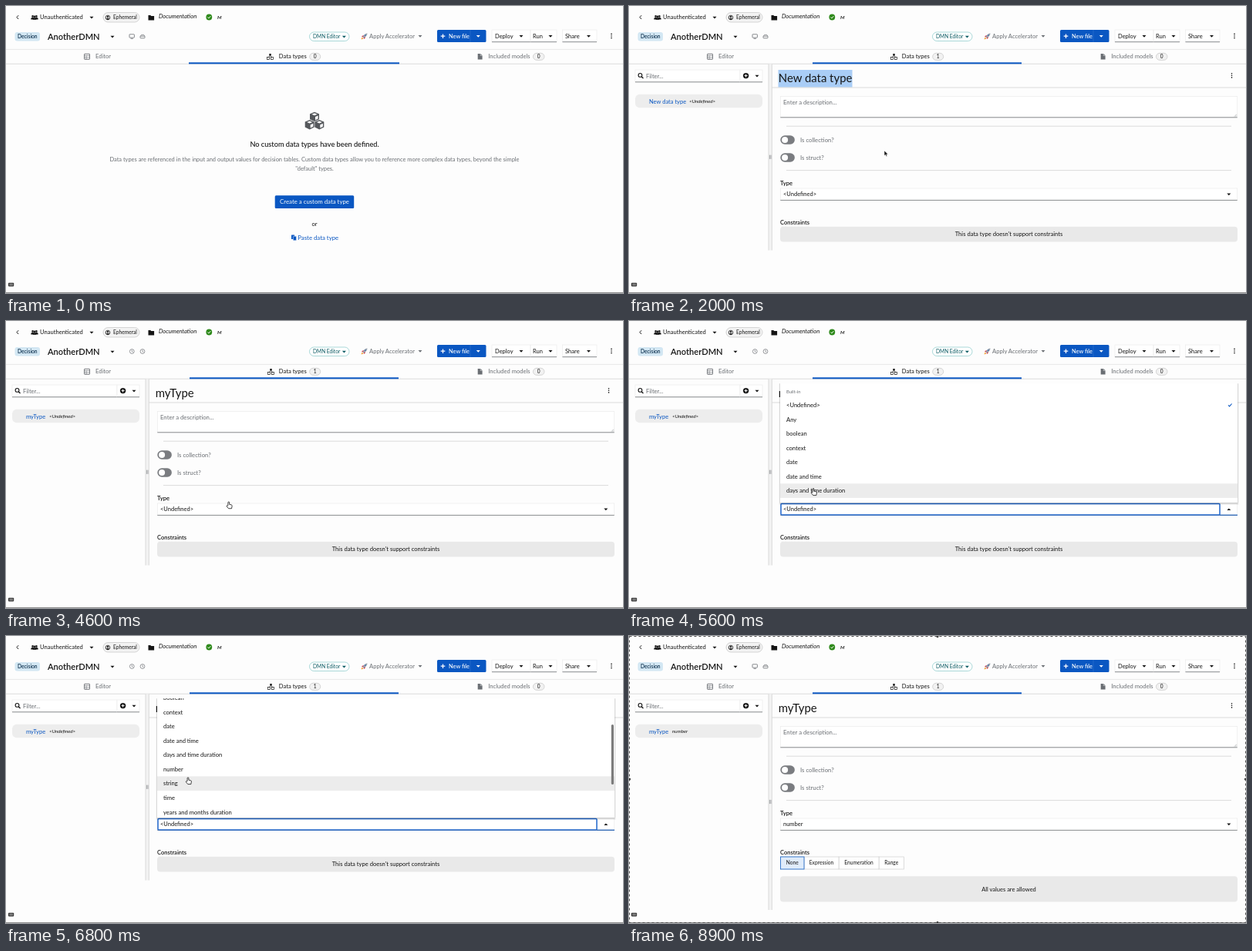
Write an HTML page that moves like this. It is 800 by 373 pixels and loops after 9 s.

```html
<!DOCTYPE html>
<html lang="en">
<head>
<meta charset="utf-8">
<title>Custom data type</title>
<style>
html, body { margin: 0; width: 100%; height: 100%; overflow: hidden; background: #fdfdfd; }
#stage { display: block; width: 100vw; height: 100vh; }
text { font: 7.6px Lato, "Open Sans", sans-serif; fill: #151515; white-space: pre; }
</style>
</head>
<body>
<svg id="stage" viewBox="0 0 800 373"></svg>
<script>
const BLUE = '#0a57c2', INK = '#151515', GRAY = '#6a6e73', RULE = '#d2d2d2', EDGE = '#8a8d90';
const LOOP = 9000, STEP = 100;

// Moments at which the interface changes
const CREATED = 1100, OPENED = 5000, RENAMED = 3800, CHOSEN = 7300;
const TYPING = [[2500, 'm'], [2600, 'my'], [3000, 'myT'], [3200, 'myTy'], [3500, 'myTyp'], [3600, 'myType']];
const TYPES = ['<Undefined>', 'Any', 'boolean', 'context', 'date', 'date and time', 'days and time duration',
  'number', 'string', 'time', 'years and months duration'];
const ROW = 18.55;

// Pointer stops: time, x, y
const POINTER = [[200, 511, 361], [300, 464, 271], [400, 464, 271], [900, 412, 254], [1100, 408, 252], [1400, 400, 246],
  [2000, 331, 188], [2200, 322, 180], [3900, 322, 180], [4700, 284, 243], [5300, 262, 243], [5400, 258, 240],
  [5600, 239, 218], [6400, 236, 195], [6800, 236, 184], [7200, 235, 174], [7700, 235, 173],
  [8200, 243, 295], [8300, 243, 295], [8800, 330, 385]];
const SCROLL = [[6400, 0], [6800, 66]];

const el = (name, attrs, body = '') =>
  `<${name} ${Object.entries(attrs).map(([k, v]) => `${k}="${v}"`).join(' ')}>${body}</${name}>`;
const text = (x, y, s, { size, weight, italic, fill, mid } = {}) => el('text', { x, y,
  'text-anchor': mid ? 'middle' : 'start',
  style: (size ? `font-size:${size}px;` : '') + (weight ? `font-weight:${weight};` : '') +
    (italic ? 'font-style:italic;' : '') + (fill ? `fill:${fill}` : '') }, s.replace(/</g, '&lt;'));
const rect = (x, y, width, height, fill, rx = 0, stroke = 'none', sw = .7) =>
  el('rect', { x, y, width, height, fill, rx, stroke, 'stroke-width': sw });
const fillPath = (d, fill = INK) => el('path', { d, fill });
const line = (d, stroke = INK, width = 1) => el('path', { d, fill: 'none', stroke, 'stroke-width': width });
const dot = (cx, cy, r, fill = INK) => el('circle', { cx, cy, r, fill });
const ring = (cx, cy, r, stroke, width = .7) => el('circle', { cx, cy, r, fill: 'none', stroke, 'stroke-width': width });
const at = (x, y, body) => el('g', { transform: `translate(${x} ${y})` }, body);
const caret = (x, y, fill = INK, up = false) => fillPath(`M${x - 2.5} ${y + (up ? 1.3 : -1.3)}h5l-2.5 ${up ? -2.7 : 2.7}z`, fill);
const kebab = (x, y) => [-2.6, 0, 2.6].map(d => dot(x, y + d, .8)).join('');
const field = (x, y, w, h) => rect(x, y, w, h, '#fff', 0, '#ececec') + line(`M${x} ${y + h}h${w}`, EDGE);
const pill = (x, y, w, h, fill, stroke) => rect(x, y, w, h, fill, h / 2, stroke);

function along(stops, t) {
  if (t <= stops[0][0]) return stops[0].slice(1);
  const i = stops.findIndex(s => s[0] >= t);
  if (i < 0) return stops.at(-1).slice(1);
  const [a, b] = [stops[i - 1], stops[i]], k = (t - a[0]) / (b[0] - a[0]);
  return a.slice(1).map((v, j) => v + (b[j + 1] - v) * k);
}

const person = (x, y, fill) => dot(x, y - 1.6, 1.3, fill) + fillPath(`M${x - 2.2} ${y + 2.4}v-1q0-1.5 1.5-1.5h1.4q1.5 0 1.5 1.5v1z`, fill);

const rocket = at(464.5, 39.5,
  fillPath('M-4 4l1-3 2 2z', '#f2a13a') +
  fillPath('M-3.6.2l2.4-1.8 2.8 2.8-1.6 2.4-1-2-1.3-1.2z', '#c8374a') +
  fillPath('M4-4Q.5-4-2 .8L-.8 2Q4-.5 4-4z', '#9aa4b0') + dot(1.3, -1.4, .9, '#3d6fa8'));

const header = [
  line('M16.2 12.2l-2.3 2.4 2.3 2.4', INK, 1),
  person(34.6, 15, INK), person(39.4, 15, INK), person(37, 15.4, INK),
  text(44, 17.4, 'Unauthenticated'), caret(111, 15),
  pill(126, 8.5, 47, 12.5, '#f3f3f3', '#c4c4c4'), ring(132, 15, 2.8, INK, .8), dot(132, 14.2, 1.1), fillPath('M130.2 16.8q1.8-1.9 3.6 0l-1.8 1z'),
  text(139, 17.4, 'Ephemeral', { size: 6.65 }),
  fillPath('M184.5 12h2.8l1 1.1h3.8v5.4h-7.6z'),
  text(198, 16.2, 'Documentation', { italic: true }),
  dot(263.3, 14.5, 3.9, '#2f8a1c'), line('M261.4 14.6l1.4 1.4 2.5-2.8', '#fff', 1),
  text(274, 17.2, 'M', { size: 6.4, italic: true, weight: 600 }),
  rect(11.5, 34, 32.5, 11.5, '#d3e7f3', 3), text(15, 42.2, 'Decision', { size: 6.7, weight: 600, fill: '#0c2f4d' }),
  text(54, 43.8, 'AnotherDMN', { size: 11.1, weight: 600 }), caret(138, 40),
  pill(393.5, 34, 51.5, 11.5, '#fff', '#86c9c9'), text(398, 42, 'DMN Editor', { size: 6.6, fill: '#0b5b63' }), caret(438.4, 40, '#0b5b63'),
  rocket, text(471, 42, 'Apply Accelerator', { fill: GRAY }), caret(537, 39.3, GRAY),
  rect(559, 31, 63.5, 16, BLUE, 1.5), line('M602 31v16', '#2f74d0', .6), line('M563.7 39.2h5.6M566.5 36.4v5.6', '#fff', 1.2),
  text(574, 41.8, 'New file', { size: 7.4, weight: 500, fill: '#fff' }), caret(612.3, 39.3, '#fff'),
  field(630, 31, 84, 15.7), line('M680 31v15.7', '#e2e2e2', .7),
  text(634, 41.8, 'Deploy', { size: 7.5 }), caret(668, 39.3), text(683, 41.8, 'Run', { size: 7.5 }), caret(706, 39.3),
  field(721.5, 31, 44.5, 15.7), text(725, 41.8, 'Share'), caret(755.5, 39.3), kebab(785, 39),
  line('M0 56.4H800', '#e4e4e4', .8), line('M0 75.2H800', RULE, .8),
  rect(101.5, 62.3, 7, 7, 'none', .5, GRAY, .9), line('M101.5 64.6h7M101.5 67h7M104 64.6v4.7', GRAY, .6),
  text(116, 68.4, 'Editor', { fill: GRAY }),
  fillPath('M611.7 62h3.6l2.3 2.3v5.3h-5.9z', GRAY), line('M615.2 62v2.4h2.4', '#fff', .5),
  text(625.3, 68.4, 'Included models', { fill: GRAY }),
  pill(683.5, 61.3, 14.5, 9, '#f2f2f2', '#c4c4c4'), text(690.7, 68.2, '0', { size: 6.6, mid: true }),
  rect(3, 359.8, 7.2, 4.6, '#333', .8), line('M4.2 361.3h5M4.2 362.9h5', '#fff', .5),
  line('M0 372.5H800', '#858585', .9)
].join('');

const syncIcons = pending => pending
  ? [163.3, 177].map(x => ring(x, 39.5, 2.9, GRAY) + line(`M${x} 37.7v2l1.3.7`, GRAY, .7)).join('')
  : rect(160, 36.8, 6.4, 4.3, 'none', .5, GRAY, .8) + line('M161.6 42.4h3.2', GRAY, .8) +
    rect(174, 39.2, 6, 2.6, 'none', .7, GRAY, .8) + line('M174.2 39.4l1.2-1.8h3.4l1.2 1.8', GRAY, .7);

const tab = created => at(created ? 1 : 0, 0,
    line('M342.5 63.6l-2.2 3.8M342.5 63.6l2.2 3.8', INK, .7) + rect(341.3, 62, 2.4, 2.4, INK) +
    rect(338.6, 66.6, 2.8, 2.8, '#fff', 0, INK) + rect(343.6, 66.6, 2.8, 2.8, '#fff', 0, INK)) +
  text(353.8, 68.4, 'Data types') +
  pill(393.7, 61.3, 14, 9, '#f2f2f2', '#c4c4c4') + text(400.7, 68.2, created ? '1' : '0', { size: 6.6, mid: true }) +
  (created ? rect(238, 73.3, 271, 2, BLUE) : rect(237, 73.3, 273, 2, BLUE));

const cube = (x, y) => at(x, y, fillPath('M0-6.2L6-3.6V3.4L0 6.2-6 3.4V-3.6z', '#55585c') +
  fillPath('M0-4.7L3.6-3.1 0-1.6-3.6-3.1z', '#fdfdfd') + fillPath('M1 .1L4.6-1.5V2.6L1 4.3z', '#fdfdfd'));

const emptyState = hover => cube(400, 143.9) + cube(393.7, 154.2) + cube(406.3, 154.2) +
  text(400, 183.3, 'No custom data types have been defined.', { size: 9.2, weight: 500, mid: true }) +
  text(400, 202.4, 'Data types are referenced in the input and output values for decision tables. Custom data types allow you to reference more complex data types, beyond the simple',
    { size: 7.45, fill: GRAY, mid: true }) +
  text(400, 213.8, '"default" types.', { size: 7.45, fill: GRAY, mid: true }) +
  rect(348.7, 246.3, 102.5, 16.6, hover ? '#004080' : BLUE, 1.5) +
  text(400, 257.3, 'Create a custom data type', { size: 7.8, fill: '#fff', mid: true }) +
  text(400, 286, 'or', { mid: true }) +
  rect(370, 297.4, 4.2, 5.6, BLUE, .5) + rect(372.3, 299.2, 4.2, 5.6, BLUE, .5, '#fdfdfd', .5) +
  text(378.3, 303.6, 'Paste data type', { size: 7.8, fill: BLUE });

const toggle = (y, label) => rect(196.3, y - 5.7, 18.6, 11.4, '#7a7c80', 5.7) + dot(202.1, y, 4, '#fff') +
  text(222, y + 2.7, label, { size: 7.75, fill: GRAY });

function sidebar(name, type, bottom) {
  const grip = (75 + bottom) / 2;
  return field(8, 83, 136, 15.8) + ring(14.5, 89.9, 2.4, INK, 1.1) + line('M16.2 91.7l2.3 2.3', INK, 1.3) +
    text(22, 93.6, 'Filter...', { fill: GRAY }) +
    field(144, 83, 29, 15.8) + dot(151.6, 90.6, 3.7) + line('M149.6 90.6h4M151.6 88.6v4', '#fff', 1) + caret(166, 91) +
    rect(8, 114.7, 165, 17.6, '#ededed', 6) +
    text(26, 126.6, name, { size: 7.5, fill: BLUE }) +
    text(name === 'myType' ? 56 : 78, 126, type, { size: 6.3, italic: true }) +
    rect(181, 75.5, 4.2, bottom - 75.5, '#f3f3f3') + line(`M181 75.5V${bottom}M185.3 75.5V${bottom}`, RULE, .8) +
    line(`M182.4 ${grip - 2.6}v5.2M184 ${grip - 2.6}v5.2`, GRAY, .6);
}

function titleBox(t) {
  const typed = TYPING.filter(([from]) => t >= from).at(-1)?.[1];
  const caretX = 194 + [...(typed ?? '')].reduce((w, c) => w + ({ m: 12.2, T: 8.4, p: 8.2, e: 7.8 }[c] ?? 7.2), 0);
  return (typed ? '' : rect(193.5, 83, 96, 22.6, '#a9cdf6')) +
    text(193.8, 99.2, typed ?? 'New data type', { size: 14.9 }) +
    (typed && t < RENAMED ? line(`M${caretX} 84.5v19`, INK, .8) : '') +
    kebab(781.5, 90.3) + line('M185.3 106H800', RULE, .8);
}

function constraints(chosen) {
  if (!chosen) return rect(196, 286.8, 593, 19.7, '#e9e9e9', 4) +
    text(492.5, 299.2, "This data type doesn't support constraints", { mid: true });
  const edges = [196.5, 227, 272, 324, 356.5];
  return ['None', 'Expression', 'Enumeration', 'Range'].map((label, i) =>
      rect(edges[i], 287, edges[i + 1] - edges[i], 16, '#fff', 0, '#cfcfcf') +
      text((edges[i] + edges[i + 1]) / 2, 297.3, label, { size: 6.65, mid: true })).reverse().join('')
    .replace('<text', '<text') +
    rect(196.5, 287, 30.5, 16, '#e0ecfa', 0, '#2b72cc', .9) + text(211.7, 297.3, 'None', { size: 6.65, mid: true }) +
    rect(196, 312.3, 593, 33.2, '#e9e9e9', 4) + text(492.5, 331.5, 'All values are allowed', { size: 7.5, mid: true });
}

function menu(t, y) {
  const [scroll] = along(SCROLL, t), top = 100 - scroll;
  const hover = y < 236 ? Math.floor((y - top) / ROW) : -1;
  const rows = TYPES.map((name, i) =>
    (i === hover ? rect(196, top + i * ROW, 593, ROW, '#ececec') : '') + text(204, top + i * ROW + 12, name)).join('');
  const body = rect(196, 81, 593, 155, '#fff') + text(204, 94 - scroll, 'Built-in', { size: 5.8, fill: GRAY }) + rows +
    line(`M777 ${109.3 - scroll}l1.6 1.6 3-3.4`, BLUE, 1.1) +
    (t >= 6500 ? rect(784.8, 81 + scroll * .515, 3.2, 78, '#7c7c7c', 1.6) : '');
  return [3, 2, 1].map(d => rect(196 - d / 2, 81, 593 + d, 155 + d, 'rgba(0,0,0,.06)', 1)).join('') +
    el('svg', { x: 196, y: 81, width: 593, height: 155, viewBox: '196 81 593 155' }, body);
}

function editor(t, y) {
  const chosen = t >= CHOSEN, open = t >= OPENED && !chosen, type = chosen ? 'number' : '<Undefined>';
  return sidebar(t >= RENAMED ? 'myType' : 'New data type', type, chosen ? 356 : 317.5) + titleBox(t) +
    field(196.3, 117.5, 592.4, 27.3) + line('M785 143.6l2.8-2.8M786.7 143.8l1.2-1.2', GRAY, .5) +
    text(200, 128.4, 'Enter a description...', { size: 7.75, fill: GRAY }) +
    line('M204 156.2H781M204 213.6H781', RULE, .8) +
    toggle(174, 'Is collection?') + toggle(197, 'Is struct?') +
    text(196, 233.4, 'Type', { weight: 600 }) + field(196.3, 237, 592.4, 15.4) +
    (open ? rect(197, 237.5, 569, 14.4, '#fff', 1, '#1f66cc', 1.5) + line('M766 252.2H789', BLUE, 1) : '') +
    text(200, 247.4, type, { size: 7.5 }) + caret(777.8, 244.8, INK, open) +
    text(196, 283.6, 'Constraints', { size: 7.5, weight: 600 }) + constraints(chosen) +
    (open ? menu(t, y) : '');
}

function pointer(t, x, y) {
  if (t < 200 || (t >= 2500 && t < 4000) || t >= 8800) return '';
  const hand = (t >= 800 && t < CREATED) || (t >= 4600 && t < 7900) || (t >= 8100 && t < 8500);
  const [d, fill, stroke] = hand
    ? ['M-.9 4.7V.8a.9.9 0 0 1 1.8 0V3.2l2.6.6q1 .3.9 1.3l-.6 3.5h-4L-2.6 5.7q-.3-1.1.8-1z', '#fff', INK]
    : ['M0 0V6.6l1.6-1.4 1 2.3 1.2-.5-1-2.2H5z', INK, '#fff'];
  return at(x, y, el('path', { d, fill, stroke, 'stroke-width': hand ? .8 : .5 }));
}

const captureFrame = el('rect', { x: .5, y: .5, width: 799, height: 372, fill: 'none', stroke: '#555', 'stroke-dasharray': '3 3' }) +
  [[400, .8], [400, 372.2], [.8, 186], [799.2, 186]].map(([x, y]) => dot(x, y, 1.5, '#444')).join('');

function scene(t) {
  const [x, y] = along(POINTER, t), created = t >= CREATED;
  const pending = (created && t < 1900) || (t >= RENAMED && t < 8100);
  return header + syncIcons(pending) + tab(created) +
    (created ? editor(t, y) : emptyState(t >= 800)) +
    pointer(t, x, y) + (t >= 8800 ? captureFrame : '');
}

const stage = document.getElementById('stage');
let shown = -1;
function tick() {
  const t = Math.floor(performance.now() % LOOP / STEP) * STEP;
  if (t !== shown) stage.innerHTML = scene(shown = t);
  requestAnimationFrame(tick);
}
tick();
</script>
</body>
</html>
```
